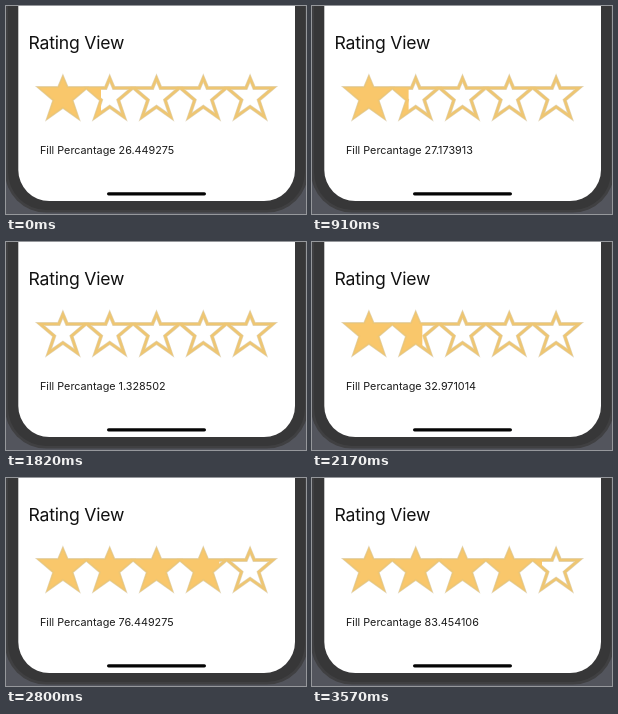
An HTML page for the animation above (3.64 s loop, 300 by 208 pixels).

```html
<!DOCTYPE html>
<html lang="en">
<head>
<meta charset="utf-8">
<title>Rating View</title>
<style>
  html, body { margin: 0; width: 100%; height: 100%; overflow: hidden; background: #53555d; }
  svg { display: block; width: 300px; height: 208px; }
  text { font-family: Inter, "Liberation Sans", sans-serif; fill: #111; }
  .title { font-size: 17.6px; letter-spacing: -0.2px; }
  .label { font-size: 10.8px; fill: #1c1c1c; }
  .edge, .line { fill: none; stroke-miterlimit: 6; }
  .edge { stroke: #e2d6ba; stroke-width: 3.8; }
  .line { stroke: #eec673; stroke-width: 2.6; }
  .fill { fill: #f9c76b; }
</style>
</head>
<body>
<svg viewBox="0 0 300 208">
  <defs>
    <path id="star"/>
    <clipPath id="level"><rect id="bar" y="60" width="0" height="64"/></clipPath>
  </defs>
  <rect width="300" height="208" fill="#53555d"/>
  <rect x="-1" y="-80" width="303" height="286.5" rx="41" fill="#404042"/>
  <rect x="2" y="-80" width="297" height="284" rx="38" fill="#373738"/>
  <rect x="12.3" y="-80" width="276.7" height="275" rx="31" fill="#fff"/>
  <text class="title" x="22.5" y="43.3">Rating View</text>
  <g id="edges" class="edge"></g>
  <g id="lines" class="line"></g>
  <g id="fills" class="fill" clip-path="url(#level)"></g>
  <text class="label" id="label" x="34" y="148"></text>
  <rect x="101" y="186.2" width="99" height="3.2" rx="1.6" fill="#050505"/>
</svg>
<script>
const STEP = 70, LOOP = 3640, UNITS = 828;
const LEFT = 32.2, WIDTH = 237;

const easeIn = u => 1 - Math.cos(u * Math.PI / 2);
const easeOut = u => Math.sin(u * Math.PI / 2);
const smooth = u => (1 - Math.cos(u * Math.PI)) / 2;

// Each drag of the slider; the value rests until the next one.
const drags = [
  { start: 0, end: 70, from: 219, to: 219, ease: smooth },
  { start: 280, end: 350, from: 532, to: 532, ease: smooth },
  { start: 630, end: 1120, from: 493, to: 54, ease: smooth },
  { start: 1120, end: 1260, from: 54, to: 95, ease: smooth },
  { start: 1260, end: 1680, from: 95, to: 18, ease: smooth },
  { start: 1820, end: 2170, from: 11, to: 273, ease: easeIn },
  { start: 2170, end: 2800, from: 273, to: 633, ease: easeOut },
  { start: 3220, end: 3570, from: 636, to: 691, ease: smooth }
];

const el = id => document.getElementById(id);

el("star").setAttribute("d",
  "M0 72.2L4.1 82H22.8L8.6 94L14.3 110.8L0 100.8" +
  "L-14.3 110.8L-8.6 94L-22.8 82H-4.1Z");

for (const id of ["edges", "lines", "fills"]) {
  for (let i = 0; i < 5; i++) {
    const star = document.createElementNS("http://www.w3.org/2000/svg", "use");
    star.setAttribute("href", "#star");
    star.setAttribute("x", 56.9 + 46.8 * i);
    el(id).append(star);
  }
}

function valueAt(time) {
  const { start, end, from, to, ease } = drags.findLast(d => d.start <= time);
  const u = Math.min((time - start) / (end - start), 1);
  return Math.round(from + (to - from) * ease(u));
}

function draw(time) {
  const part = valueAt(Math.floor(time / STEP) * STEP) / UNITS;
  el("bar").setAttribute("width", LEFT + WIDTH * part);
  el("label").textContent = "Fill Percantage " + (part * 100).toFixed(6);
}

const begin = performance.now();
function tick() {
  draw((performance.now() - begin) % LOOP);
  requestAnimationFrame(tick);
}
tick();
</script>
</body>
</html>
```
